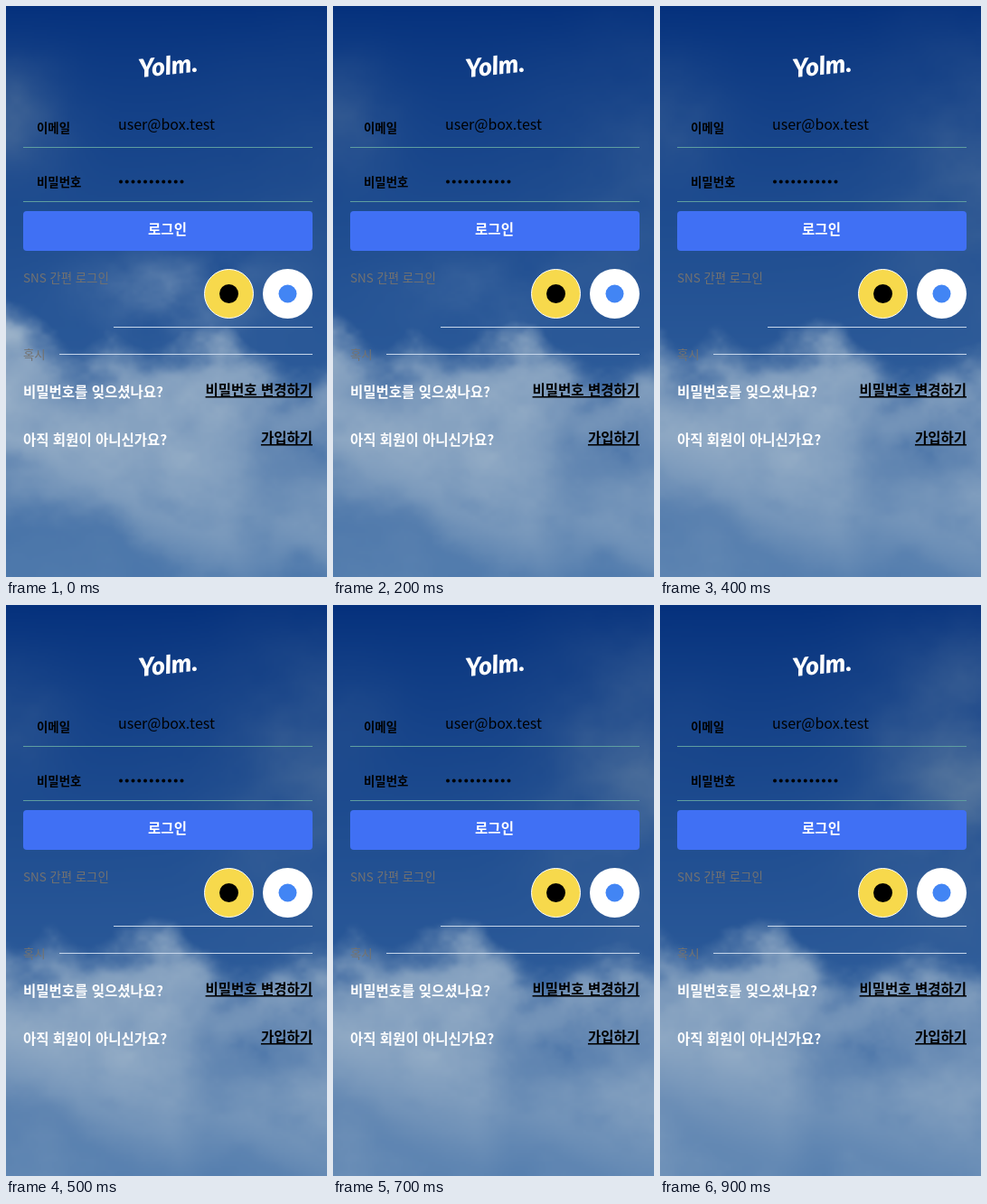
An HTML page with a canvas that plays this animation: 355x632 px, repeating every 1 s.

```html
<!DOCTYPE html>
<html lang="ko">
<head>
<meta charset="utf-8">
<title>로그인</title>
<style>
  html, body { margin: 0; width: 100%; height: 100%; overflow: hidden; background: #1a4b8e; }
  canvas, svg { position: absolute; left: 0; top: 0; width: 355px; height: 632px; }
  svg { font: 700 15.5px "Noto Sans CJK KR", "Noto Sans CJK", sans-serif; }
  .small { font-size: 13.4px; }
  .hint { fill: #737270; font-weight: 400; }
  .white { fill: #fff; }
  .link { text-anchor: end; text-decoration: underline 1px; }
  .logo { font: italic 900 28px Lato, sans-serif; }
</style>
</head>
<body>
<canvas id="sky" width="178" height="316"></canvas>
<svg viewBox="0 0 355 632">
  <text class="logo white" x="179" y="76" text-anchor="middle" transform="rotate(-6 179 66)">Yolm.</text>

  <text class="small" x="34" y="140">이메일</text>
  <text x="124" y="137" font-size="16" font-weight="400">user@box.test</text>
  <text class="small" x="34" y="200">비밀번호</text>
  <path d="M127 194.5H195" stroke="#000" stroke-width="4" stroke-linecap="round" stroke-dasharray="0 6.75"/>
  <path d="M19 156.5H339M19 216.5H339" stroke="#5f9ea0"/>

  <rect x="19" y="227" width="320" height="44" rx="4" fill="#4070f4"/>
  <text class="white" x="178.5" y="253" text-anchor="middle">로그인</text>

  <text class="small hint" x="19" y="306">SNS 간편 로그인</text>
  <text class="small hint" x="19" y="391">혹시</text>
  <path d="M119 355.5H339M59 385.5H339" stroke="#c6d6ea"/>
  <circle cx="246.5" cy="318.5" r="27" fill="#f7d94c" stroke="#fff"/>
  <circle cx="246.5" cy="318.5" r="10.5"/>
  <circle cx="311.5" cy="318.5" r="27.5" fill="#fff"/>
  <circle cx="311.5" cy="318.5" r="10" fill="#4285f4"/>

  <text class="white" x="19" y="433">비밀번호를 잊으셨나요?</text>
  <text class="link" x="339" y="431">비밀번호 변경하기</text>
  <text class="white" x="19" y="486">아직 회원이 아니신가요?</text>
  <text class="link" x="339" y="484">가입하기</text>
</svg>
<script>
const STEP = 100, STEPS = 10, DRIFT = 12;
const canvas = document.getElementById('sky');
const ctx = canvas.getContext('2d');
const W = canvas.width, H = canvas.height;

const skyTop = [4, 48, 124], skyBottom = [58, 106, 164];
const cloudColor = [160, 182, 203], hazeColor = [104, 132, 162];

let seed = 11;
const grid = Float32Array.from({ length: 4096 }, () =>
  (seed = (seed * 16807) % 2147483647) / 2147483647);
const lattice = (i, j) => grid[(i & 63) + ((j & 63) << 6)];
const mix = (a, b, t) => a + (b - a) * t;
const clamp = v => Math.min(1, Math.max(0, v));
const smooth = t => (t = clamp(t), t * t * (3 - 2 * t));
const puff = (dx, dy, rx, ry) => Math.exp(-((dx / rx) ** 2) - (dy / ry) ** 2);

function noise(x, y) {
  const i = Math.floor(x), j = Math.floor(y);
  const u = smooth(x - i), v = smooth(y - j);
  return mix(mix(lattice(i, j), lattice(i + 1, j), u),
             mix(lattice(i, j + 1), lattice(i + 1, j + 1), u), v);
}

// Octaves slide slowly against each other, so the clouds boil as they drift.
function fbm(x, y, step) {
  let sum = 0, amp = 0.5;
  for (let o = 0; o < 5; o++) {
    sum += amp * (noise(x + o * 7.3 + step * 0.03 * o, y + o * 11.7) - 0.5);
    x *= 2; y *= 2; amp /= 2;
  }
  return sum;
}

// A bank with a billowing top that steps down at its drifting right end
// and thins out towards the bottom left.
function cloudCover(x, y, step, n) {
  const right = smooth((x + DRIFT * step - 235) / 60);
  const top = 360 + 55 * right;
  const body = smooth((y - top) / 75 + 2 * n + 0.3);
  const fade = smooth((y + 2 * n * 60 - 485 - 0.3 * x) / 90);
  const wisp = 0.5 * puff(x - 190 + DRIFT * step, y - 315, 85, 40) * clamp(1 - step / 3) * (1 + 3 * n);
  const bank = body * (0.75 - 0.2 * right + 0.6 * n) * (1 - fade * (0.75 - 0.04 * step));
  return clamp(Math.max(bank, wisp));
}

function hazeCover(x, y, step, n) {
  const left = 0.35 * (1 - step / STEPS) * puff(x - 10, y - 120, 55, 60);
  const right = (0.08 + 0.04 * step) * puff(x - 345, y - 190, 110, 150);
  return clamp((left + right) * (1 + 2 * n));
}

function render(step) {
  const img = ctx.createImageData(W, H);
  for (let j = 0, p = 0; j < H; j++) {
    const y = j * 2, depth = (j / H) ** 0.75;
    for (let i = 0; i < W; i++, p += 4) {
      const x = i * 2, n = fbm((x + DRIFT * step) / 85, y / 70, step);
      const haze = hazeCover(x, y, step, n), cloud = cloudCover(x, y, step, n);
      for (let c = 0; c < 3; c++) {
        const sky = mix(skyTop[c], skyBottom[c], depth);
        img.data[p + c] = mix(mix(sky, hazeColor[c], haze), cloudColor[c], cloud);
      }
      img.data[p + 3] = 255;
    }
  }
  return img;
}

const skies = Array.from({ length: STEPS }, (_, step) => render(step));
const start = performance.now();

function draw() {
  const step = Math.floor((performance.now() - start) / STEP) % STEPS;
  ctx.putImageData(skies[step], 0, 0);
  requestAnimationFrame(draw);
}
draw();
</script>
</body>
</html>
```
